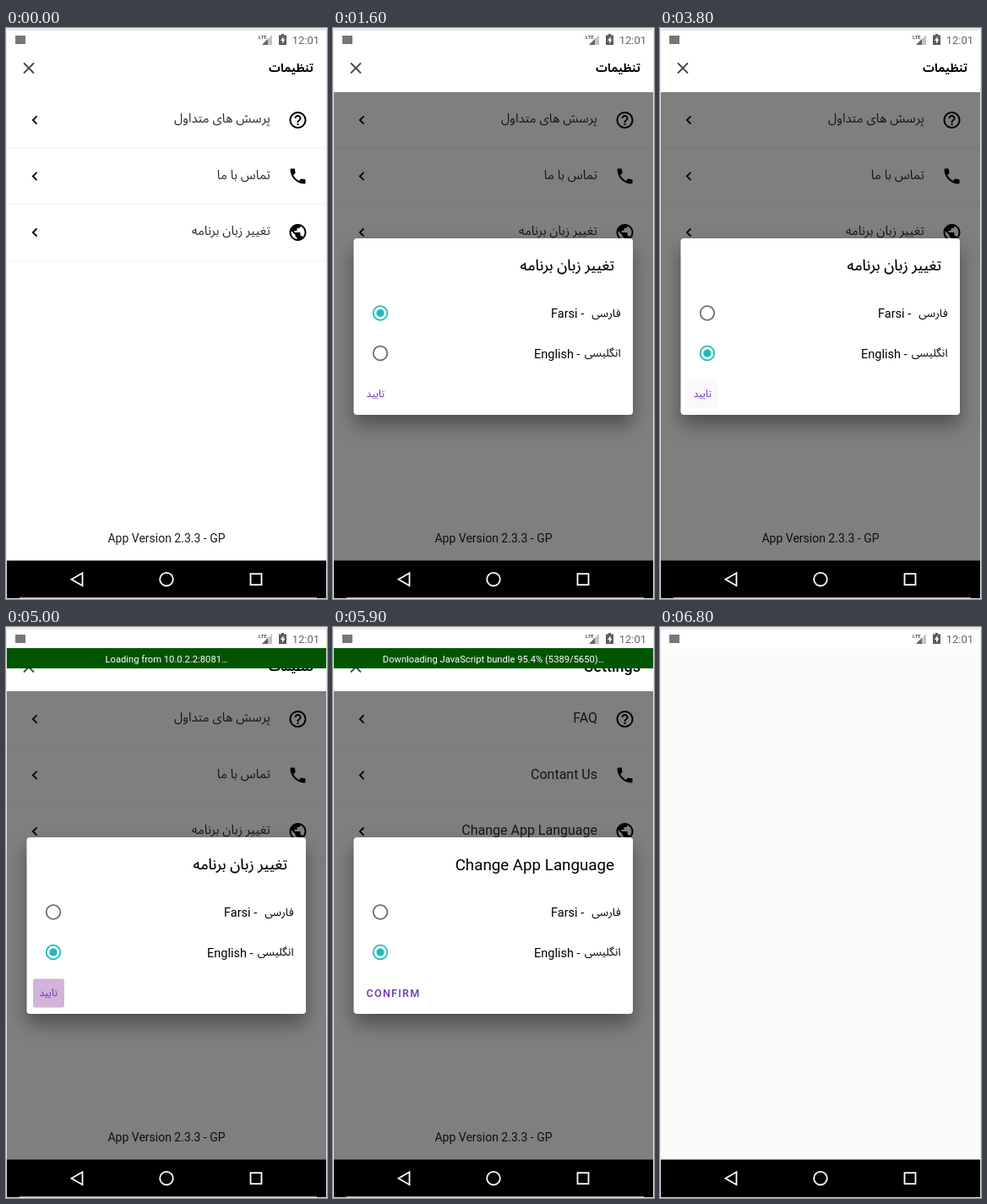
These frames come from a looping animation (380x676 px, 8 s). An HTML page:

```html
<!DOCTYPE html>
<html lang="en">
<head>
<meta charset="utf-8">
<title>Settings language switch</title>
<style>
  html, body { margin: 0; width: 100%; height: 100%; overflow: hidden; background: #fff; }
  svg { display: block; width: 380px; height: 676px; }
  text { font-family: Roboto, "Noto Sans Arabic", "DejaVu Sans", sans-serif; white-space: pre; }
  .end { text-anchor: end; }
  .mid { text-anchor: middle; }
  .fa { font-family: "Noto Sans Arabic", "DejaVu Sans", sans-serif; }
  .item { fill: #2b2b2b; }
  .item.fa { font-size: 14.8px; }
  .item.en { font-size: 16px; }
  .head.fa { font-size: 13.7px; font-weight: 700; }
  .head.en { font-size: 18px; font-weight: 500; }
  .ask.fa { font-size: 17.7px; stroke: #000; stroke-width: .2px; }
  .ask.en { font-size: 18.75px; }
  .ok { fill: #6a32b4; }
  .ok.fa { font-size: 12px; }
  .ok.en { font-size: 12.5px; font-weight: 500; letter-spacing: 1.3px; }
  .opt { font-size: 14.5px; }
  .opt.fa { font-size: 13.1px; }
  .line { fill: none; stroke-width: 1.8; }
  #dialog > rect:first-child { filter: drop-shadow(0 12px 11px rgba(0, 0, 0, .38)); }
</style>
</head>
<body>
<svg id="stage" viewBox="0 0 380 676"></svg>
<script>
const LOOP = 8000, STEP = 100;
const OPEN = 900, PICK = 2600, PRESS = 3800, RELEASE = 5000;
const ENGLISH = 5200, DOWNLOAD = 5300, BLANK = 6000, CLEAN = 6800;
const TOTAL = 5650;

const ICONS = {
  help: 'M11 18h2v-2h-2v2zm1-16C6.48 2 2 6.48 2 12s4.48 10 10 10 10-4.48 10-10S17.52 2 12 2zm0 18c-4.41 0-8-3.59-8-8s3.59-8 8-8 8 3.59 8 8-3.59 8-8 8zm0-14c-2.21 0-4 1.79-4 4h2c0-1.1.9-2 2-2s2 .9 2 2c0 2-3 1.75-3 5h2c0-2.25 3-2.5 3-5 0-2.21-1.79-4-4-4z',
  phone: 'M6.62 10.79c1.44 2.83 3.76 5.14 6.59 6.59l2.2-2.2c.27-.27.67-.36 1.02-.24 1.12.37 2.33.57 3.57.57.55 0 1 .45 1 1V20c0 .55-.45 1-1 1-9.39 0-17-7.61-17-17 0-.55.45-1 1-1h3.5c.55 0 1 .45 1 1 0 1.25.2 2.45.57 3.57.11.35.03.74-.25 1.02l-2.2 2.2z',
  globe: 'M12 2C6.48 2 2 6.48 2 12s4.48 10 10 10 10-4.48 10-10S17.52 2 12 2zm-1 17.93c-3.95-.49-7-3.85-7-7.93 0-.62.08-1.21.21-1.79L9 15v1c0 1.1.9 2 2 2v1.93zm6.9-2.54c-.26-.81-1-1.39-1.9-1.39h-1v-3c0-.55-.45-1-1-1H8v-2h2c.55 0 1-.45 1-1V7h2c1.1 0 2-.9 2-2v-.41c2.93 1.19 5 4.06 5 7.41 0 2.08-.8 3.97-2.1 5.39z'
};
const ROWS = [
  [109, 'help', 'پرسش های متداول', 'FAQ'],
  [175.5, 'phone', 'تماس با ما', 'Contant Us'],
  [242, 'globe', 'تغییر زبان برنامه', 'Change App Language']
];

const rect = (x, y, w, h, fill, more = '') =>
  `<rect x="${x}" y="${y}" width="${w}" height="${h}" fill="${fill}" ${more}/>`;
const text = (x, y, cls, s, more = '') =>
  `<text x="${x}" y="${y}" class="${cls}" ${more}>${s}</text>`;
// Persian glyphs sit one pixel above the Latin baseline.
const both = (x, y, cls, fa, en) =>
  text(x, y - 1, cls + ' fa', fa) + text(x, y, cls + ' en', en);

const row = ([y, icon, fa, en]) => `
  <path class="line" d="M36.500 ${y - 4.7}l-4.700 4.700 4.700 4.700" stroke="#000" stroke-width="2"/>
  <path d="${ICONS[icon]}" transform="translate(333.5 ${y - 12})"/>
  ${both(313, y + 4, 'item end', fa, en)}
  ${rect(1, Math.floor(y + 33), 378, 1, '#f1f1f1')}`;

const radio = y => `
  <g class="radio">
    <circle class="line" cx="56" cy="${y}" r="8.3"/>
    <circle cx="56" cy="${y}" r="4.6" fill="#1cbcb8"/>
  </g>`;

const option = (y, x, latin, fa) =>
  radio(y) + text(x, y + 5.5, 'opt', latin + ' -') + text(340.5, y + 4, 'opt end fa', fa);

const status = `
  ${rect(0, 0, 380, 3, '#e9e9e9')}
  ${rect(11, 9, 12, 10, '#777')}
  ${text(299, 13, '', 'LTE', 'font-size="6" font-weight="700" fill="#555"')}
  <path d="M315 8v12h-12z" fill="#c4c4c4"/>
  <path d="M310 13v7h-7z" fill="#666"/>
  <path d="M326 7h3v1.5h3V20h-9V8.5h3z" fill="#5c5c5c"/>
  <path d="M328.5 10l-3.5 5h2v3.5l3.5-5h-2z" fill="#fff"/>
  ${text(371, 18.5, 'end', '12:01', 'font-size="13" fill="#636363"')}`;

const nav = `
  ${rect(1, 630.5, 378, 44.5, '#000')}
  <g class="line" stroke="#fff">
    <path d="M77.5 652.7l13-7.500v15z"/>
    <circle cx="190" cy="652.7" r="7.8"/>
    <rect x="289.5" y="646.2" width="13" height="13"/>
  </g>
  ${rect(16, 674, 352, 1, '#a79ba5', 'id="edge"')}
  ${rect(0, 675, 380, 1, '#ddd8e0')}
  ${rect(0, 3, 1, 672, '#e2e2e2')}
  ${rect(379, 3, 1, 672, '#e2e2e2')}`;

const $ = id => document.getElementById(id);
$('stage').innerHTML = `
  ${rect(0, 0, 380, 676, '#fff')}
  ${status}
  <g id="page">
    <path class="line" d="M21 41.500l12 12m0-12l-12 12" stroke="#484848"/>
    ${both(364, 53, 'head end', 'تنظیمات', 'Settings')}
    ${ROWS.map(row).join('')}
    ${text(190, 608.5, 'mid', 'App Version 2.3.3 - GP', 'font-size="14" fill="#1c1c1c"')}
  </g>
  ${rect(1, 76, 378, 555, '#000', 'id="scrim" opacity=".5"')}
  <g id="dialog">
    ${rect(24.5, 249, 330.5, 209, '#fff', 'rx="4"')}
    ${both(333, 288, 'ask end', 'تغییر زبان برنامه', 'Change App Language')}
    ${option(337.5, 258, 'Farsi', 'فارسی')}
    ${option(385, 238, 'English', 'انگلیسی')}
    ${rect(32, 416.5, 37, 34, '#d3b3da', 'rx="3" id="ripple"')}
    ${both(39.5, 438, 'ok', 'تایید', 'CONFIRM')}
  </g>
  <g id="banner">
    ${rect(0, 25, 380, 24, '#005400')}
    ${text(190, 41.5, 'mid', '', 'id="message" font-size="11.2" fill="#fff"')}
  </g>
  ${rect(1, 25, 378, 606, '#fafafa', 'id="blank"')}
  ${nav}`;

const radios = document.querySelectorAll('.radio');
const persian = document.querySelectorAll('.item.fa, .head.fa, .ask.fa, .ok.fa');
const english = document.querySelectorAll('.en');

const show = (el, on) => { el.style.display = on ? '' : 'none'; };
const part = (t, a, b) => Math.min(1, Math.max(0, (t - a) / (b - a)));

function rippleAt(t) {
  if (t < PRESS) return 0;
  if (t < RELEASE) return 0.1 + 0.45 * part(t, PRESS, 4300);
  return 1 - part(t, RELEASE, 5500);
}

function messageAt(t) {
  if (t < DOWNLOAD) return 'Loading from 10.0.2.2:8081…';
  const done = Math.round(5389 * part(t, 5200, 5900));
  return `Downloading JavaScript bundle ${(100 * done / TOTAL).toFixed(1)}% (${done}/${TOTAL})…`;
}

function draw(t) {
  const open = t >= OPEN && t < BLANK;
  const inEnglish = t >= ENGLISH;
  const choice = t >= PICK ? 1 : 0;

  show($('scrim'), open);
  show($('dialog'), open);
  show($('banner'), t >= RELEASE && t < BLANK);
  show($('blank'), t >= BLANK);
  show($('edge'), t < CLEAN);
  persian.forEach(el => show(el, !inEnglish));
  english.forEach(el => show(el, inEnglish));
  radios.forEach((el, i) => {
    el.children[0].setAttribute('stroke', i === choice ? '#1cbcb8' : '#6c6c6c');
    show(el.children[1], i === choice);
  });
  $('ripple').setAttribute('opacity', rippleAt(t));
  $('message').textContent = messageAt(t);
}

const start = performance.now();
function tick() {
  const t = (performance.now() - start) % LOOP;
  draw(Math.floor(t / STEP) * STEP);
  requestAnimationFrame(tick);
}
tick();
</script>
</body>
</html>
```
